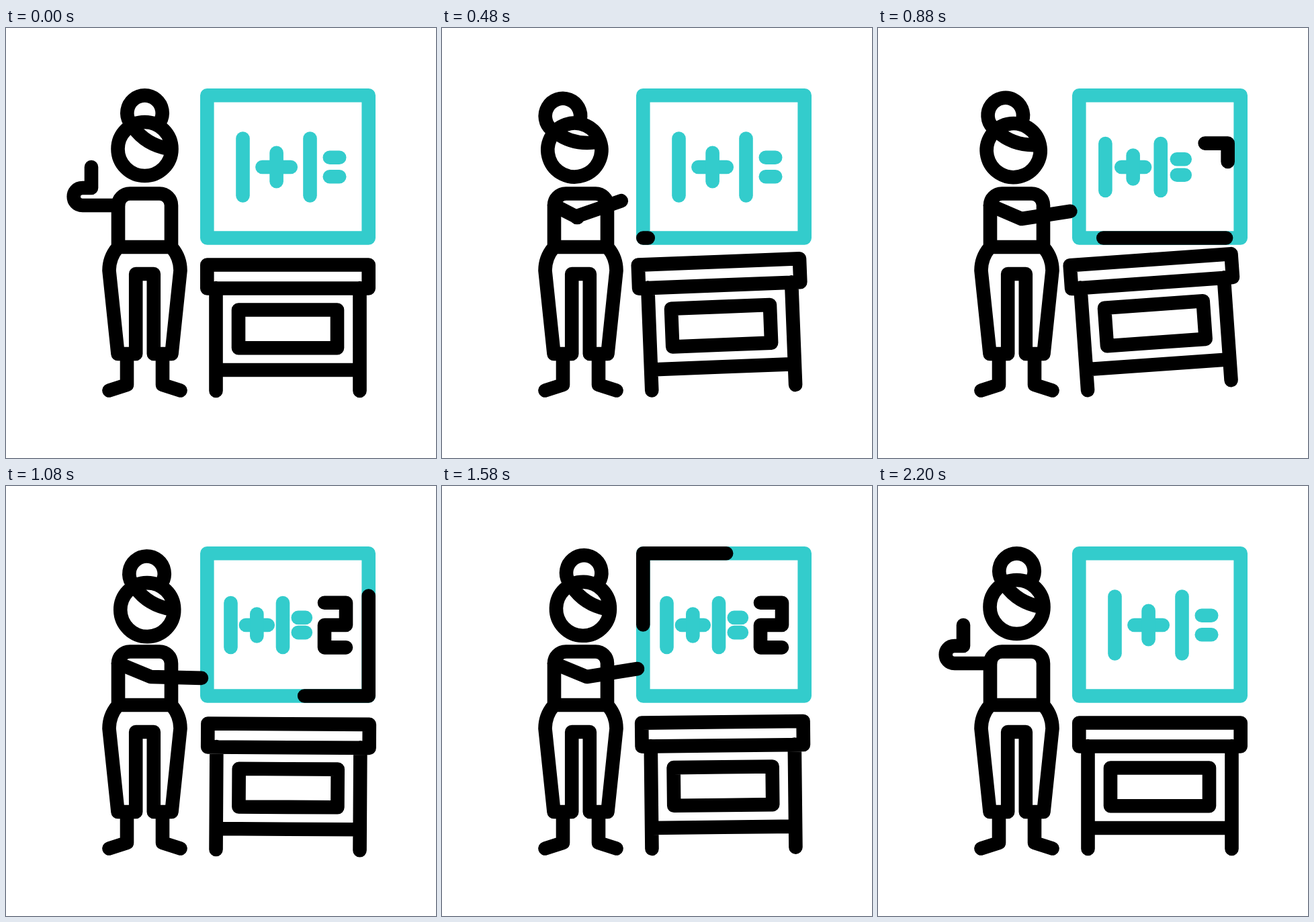
Animation of 640x640 px, one loop 2.4 s. Source, as an HTML page with a canvas:

```html
<!DOCTYPE html>
<html lang="en">
<head>
<meta charset="utf-8">
<title>Teacher at the board</title>
<style>
  html, body { margin: 0; width: 100%; height: 100%; overflow: hidden; background: #fff; }
  canvas { display: block; width: 100vw; height: 100vh; }
</style>
</head>
<body>
<canvas id="stage" width="640" height="640"></canvas>
<script>
const ctx = document.getElementById('stage').getContext('2d');
const LOOP = 2400, STEP = 20;
const TEAL = '#33cccc', BLACK = '#000';
const BOARD = { x: 299.3, y: 100.3, w: 240.4, h: 212.2 };

const mix = (a, b, k) => a + (b - a) * k;

// Eased 0 to 1 between two times
function ramp(t, from, to) {
  const u = Math.min(1, Math.max(0, (t - from) / (to - from)));
  return u * u * (3 - 2 * u);
}

// Rises to 1, holds, falls back to 0
const pulse = (t, rise, top, fall, end) => ramp(t, rise, top) - ramp(t, fall, end);
const swing = (t, rise, top, end) => pulse(t, rise, top, top, end);

function stroke(path, color = BLACK) {
  ctx.strokeStyle = color;
  ctx.stroke(path);
}

function poly(pts) {
  const p = new Path2D();
  pts.forEach(([x, y]) => p.lineTo(x, y));
  return p;
}

// Adds the mirror image of a half figure about a vertical axis
function mirror(d, axis) {
  const half = new Path2D(d), p = new Path2D(half);
  p.addPath(half, new DOMMatrix([-1, 0, 0, 1, 2 * axis, 0]));
  return p;
}

// Strokes only the part of a path between two distances
function trim(path, from, to) {
  if (to - from < 0.5) return;
  ctx.setLineDash([to - from, 4000]);
  ctx.lineDashOffset = -from;
  stroke(path);
  ctx.setLineDash([]);
}

function turned(path, x, y, degrees, dx, dy) {
  ctx.save();
  ctx.translate(x + dx, y + dy);
  ctx.rotate(degrees * Math.PI / 180);
  ctx.translate(-x, -y);
  stroke(path);
  ctx.restore();
}

const body = mirror(
  'M206.5 246.5H184.5A17.5 17.5 0 0 0 167 264V326H206.5' +
  'M166 327Q153.5 342 153.5 361L166.5 485H193.2V366H206.5' +
  'M180 485V531L153.5 539.5', 206.5);
const table = mirror(
  'M419.5 352.5H299.3V387.5H419.5' +
  'M312.5 387V540M312.5 509H419.5' +
  'M419.5 419.5H346V476.2H419.5', 419.5);
const head = new Path2D(
  'M246.5 180a40 40 0 1 1 -80 0a40 40 0 1 1 80 0Z' +
  'M184 140A26.2 26.2 0 1 1 229 140' +
  'M189 147Q208 174 243 180');

function drawBoard(t) {
  const { x, y, w, h } = BOARD, lap = 2 * (w + h);
  const frame = new Path2D();
  frame.rect(x, y, w, h);
  stroke(frame, TEAL);
  const round = poly([[x, y + h], [x + w, y + h], [x + w, y], [x, y], [x, y + h]]);
  trim(round, lap * ramp(t, 700, 2200), lap * ramp(t, 400, 1900));
}

function drawSum(t) {
  const s = 1 - 0.225 * pulse(t, 600, 1000, 1800, 2200);
  const at = (x, y) => [272.5 + (x - 272.5) * s, 207 + y * s];
  // Bar around a centre, with half its width and height
  const bar = (x, y, w, h) => stroke(poly([at(x - w, y - h), at(x + w, y + h)]), TEAL);
  for (const x of [352.5, 452.5]) bar(x, 0, 0, 42.5);
  bar(402.6, 0, 21.2, 0);
  bar(402.6, 0, 0, 21.2);
  for (const y of [-14.3, 14.3]) bar(489, y, 7.2, 0);

  const two = [];
  for (let i = 0; i < 6; i++) two.push(at(i + 1 & 2 ? 573.8 : 532.5, 43 * ((i >> 1) - 1)));
  trim(poly(two), 0, 212 * s * pulse(t, 800, 1000, 1860, 2000));
}

function drawTable(t) {
  const tilt = -5 * swing(t, 200, 800, 1100) + 0.4 * swing(t, 800, 1100, 1400)
    - 1.1 * swing(t, 1100, 1400, 1800);
  turned(table, 299.3, 545, tilt, 0, swing(t, 800, 1100, 1700));
}

function drawHead(t) {
  const tilt = -19.3 * pulse(t, 200, 500, 700, 1200) + 2.4 * pulse(t, 700, 1200, 1400, 1800);
  const lean = 4.8 * pulse(t, 700, 1200, 1400, 1800);
  turned(head, 206.5, 208, tilt, lean, lean);
}

function drawArm(t) {
  const k = pulse(t, 200, 550, 1600, 2000), reach = ramp(t, 700, 1100);
  const handX = 283 + 8 * reach, handY = 263 + 23 * reach - 14 * ramp(t, 1100, 1400);
  const elbow = 212 + 3.5 * reach;
  const low = mix(264, 284, k), top = Math.min(low, mix(238, 303, k));
  const curl = mix(114, elbow, k), tip = curl - 17.7 * (1 - k);
  const p = poly([
    [mix(127, handX, k), mix(207, handY, k)],
    [mix(127, elbow, k), mix(238, 284, k)],
    [curl, top]]);
  p.bezierCurveTo(tip, top, tip, low, curl, low);
  p.lineTo(167, 264);
  stroke(p);
}

function draw(t) {
  ctx.fillStyle = '#fff';
  ctx.fillRect(0, 0, 640, 640);
  ctx.lineWidth = 20.6;
  ctx.lineCap = ctx.lineJoin = 'round';
  drawBoard(t);
  drawSum(t);
  drawTable(t);
  stroke(body);
  drawHead(t);
  drawArm(t);
}

const start = performance.now();
function tick() {
  const t = performance.now() - start + 4;
  draw(Math.floor(t / STEP) * STEP % LOOP);
  requestAnimationFrame(tick);
}
tick();
</script>
</body>
</html>
```
